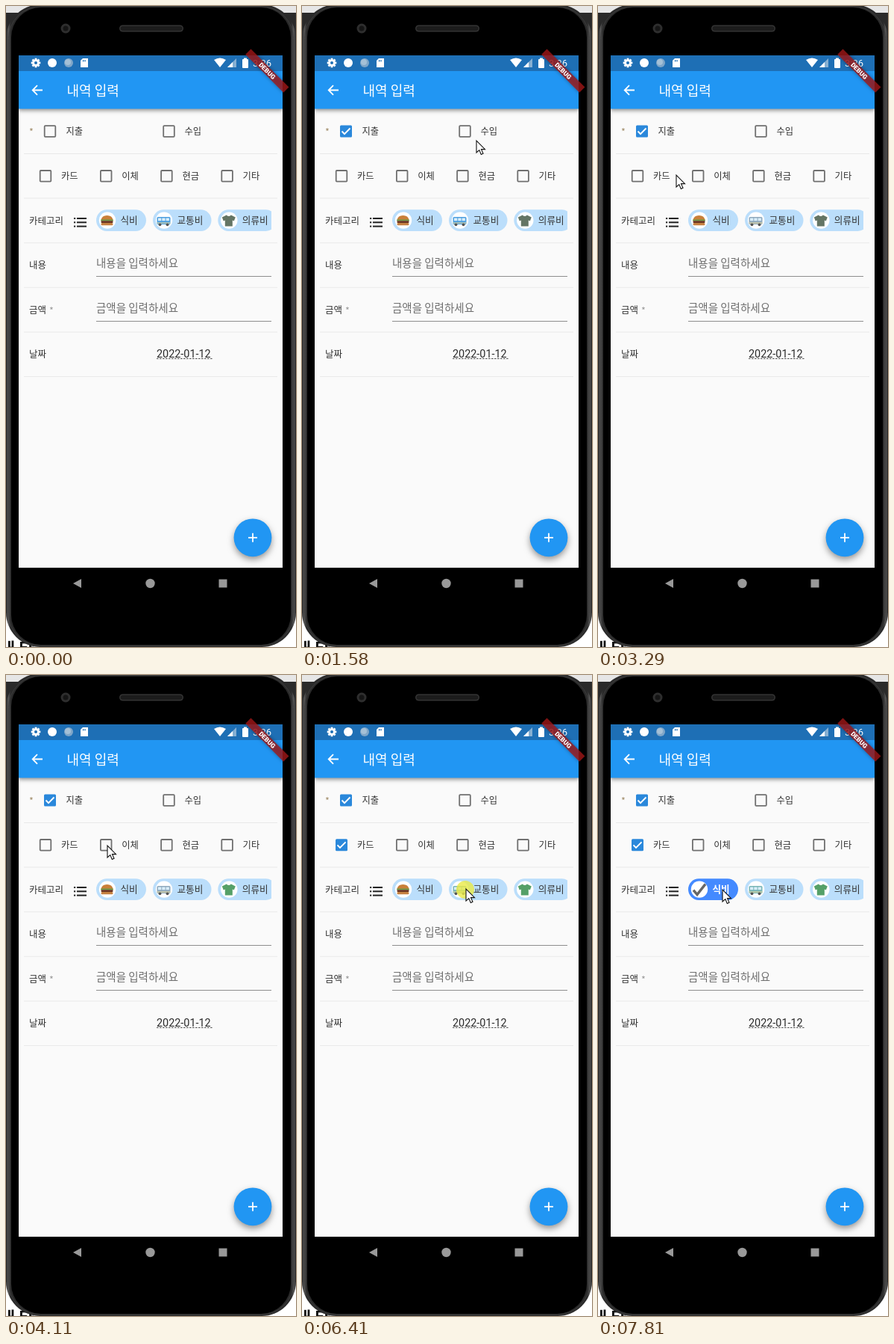
Write an HTML page with a canvas that moves like this. It is 389 by 857 pixels and loops after 8 s.

```html
<!DOCTYPE html>
<html lang="ko">
<head>
<meta charset="utf-8">
<style>
html, body { margin: 0; width: 100%; height: 100%; overflow: hidden; background: #fff; }
canvas { display: block; width: 389px; height: 857px; }
</style>
</head>
<body>
<canvas id="stage" width="389" height="857"></canvas>
<script>
const c = document.getElementById('stage').getContext('2d');
const LOOP = 8000, BLUE = '#2196f3', INK = '#333';
const KR = '"Noto Sans CJK KR", "Noto Sans CJK", sans-serif', LATIN = 'Roboto, sans-serif';

// Pointer tip: [ms, x, y]
const PATH = [
  [190, 364, 838], [480, 260, 360], [750, 130, 126], [960, 72, 168], [1060, 60, 171], [1300, 60, 171],
  [1580, 234, 180], [1780, 233, 172], [1850, 232, 171], [2200, 55, 166], [2590, 214, 168], [2700, 214, 170],
  [3290, 105, 226], [3500, 62, 226], [3560, 62, 226], [3830, 326, 228], [4110, 136, 228], [4440, 136, 228],
  [5050, 75, 231], [5260, 53, 232], [5550, 53, 232], [6050, 158, 284], [6340, 220, 286], [6410, 220, 286],
  [6690, 150, 284], [6830, 150, 284], [7180, 229, 277], [7260, 229, 277], [7600, 168, 286], [7670, 167, 287]
];
const PRESSES = [[1100, 1240], [5330, 5470], [6340, 7260], [7670, 7750]];

function pointerAt(t) {
  const i = PATH.findIndex(k => k[0] > t);
  if (i === 0) return null;
  if (i < 0) return PATH[PATH.length - 1].slice(1);
  const [t0, x0, y0] = PATH[i - 1], [t1, x1, y1] = PATH[i];
  const p = (t - t0) / (t1 - t0), e = p * p * (3 - 2 * p);
  return [x0 + (x1 - x0) * e, y0 + (y1 - y0) * e];
}

function rect(x, y, w, h, fill, r = 0) {
  c.fillStyle = fill;
  c.beginPath();
  c.roundRect(x, y, w, h, r);
  c.fill();
}
function disc(x, y, r, fill) {
  c.fillStyle = fill;
  c.beginPath();
  c.arc(x, y, r, 0, 7);
  c.fill();
}
function shape(d, x, y, fill, stroke, width = 1) {
  const p = new Path2D(d);
  c.save();
  c.translate(x, y);
  if (fill) { c.fillStyle = fill; c.fill(p); }
  if (stroke) { c.strokeStyle = stroke; c.lineWidth = width; c.stroke(p); }
  c.restore();
}
// y is the vertical middle of the glyphs
function text(s, x, y, size, color = INK, weight = 400, family = KR) {
  c.font = `${weight} ${size}px ${family}`;
  c.fillStyle = color;
  c.fillText(s, x, y + size * 0.37);
}
function shadow(color, blur, dy) {
  c.shadowColor = color;
  c.shadowBlur = blur;
  c.shadowOffsetY = dy;
}

function drawPhone() {
  rect(0, 0, 389, 857, '#fff');
  rect(0, 0, 389, 10, '#e6e6e6');
  rect(0, 9, 389, 60, '#2a2a2a');
  text('내 타', -8, 859, 22, '#111', 700);
  const rim = c.createLinearGradient(0, 0, 389, 0);
  [[0, '#222'], [.008, '#5a5a5a'], [.016, '#2a2a2a'], [.984, '#2a2a2a'], [.992, '#5a5a5a'], [1, '#222']]
    .forEach(s => rim.addColorStop(...s));
  rect(0, -2, 389, 859, rim, 46);
  rect(7, 2, 375, 852, '#000', 40);
  c.strokeStyle = '#3c3c3c';
  c.lineWidth = 1;
  c.beginPath();
  c.roundRect(3.5, 0.5, 382, 855, 43);
  c.stroke();
  disc(80, 30, 6.5, '#2e2e2e');
  disc(80, 30, 3.5, '#151515');
  rect(152, 25.5, 86, 9, '#343434', 4.5);
  rect(153.5, 27, 83, 6, '#1c1c1c', 3);
  shape('M5 -6V6L-6 0Z', 96, 772, '#999');
  disc(193.5, 772, 6.2, '#999');
  rect(285.5, 766.5, 11, 11, '#999');
}

function drawStatusBar() {
  rect(17, 66, 354, 21, '#1e6fb5');
  for (let i = 0; i < 8; i++) {
    c.save();
    c.translate(40, 76);
    c.rotate(i * Math.PI / 4);
    rect(-1.4, -6.3, 2.8, 3, '#fff');
    c.restore();
  }
  disc(40, 76, 4.8, '#fff');
  disc(40, 76, 2, '#1e6fb5');
  disc(62, 76, 6, '#fff');
  disc(84, 76, 6, '#7fa6c8');
  disc(83, 75, 4, '#a5c0d6');
  shape('M-2 -6H5V6H-5V-3Z', 105, 76, '#fff');
  rect(103, 72, 1.2, 2.5, '#1e6fb5');
  rect(105.4, 72, 1.2, 2.5, '#1e6fb5');
  shape('M0 6L-8 -4Q0 -9 8 -4Z', 287, 76, '#fff');
  shape('M6 -6V6H-6Z', 303, 76, '#86afd2');
  shape('M1 -1V6H-6Z', 303, 76, '#fff');
  rect(317, 71, 8, 12, '#fff', 1);
  rect(319, 69.5, 4, 2, '#fff');
  text('3:36', 331, 76, 13, '#fff', 400, LATIN);
}

function drawBanner() {
  c.save();
  c.translate(371, 66);
  c.rotate(Math.PI / 4);
  shadow('rgba(0,0,0,.45)', 5, 0);
  rect(-36, 24.1, 72, 10.3, 'rgba(165,24,24,.78)');
  shadow('transparent', 0, 0);
  c.textAlign = 'center';
  text('DEBUG', 0, 29.2, 8.6, '#fff', 900, LATIN);
  c.restore();
}

function checkbox(x, y, label, labelX, on) {
  if (on) {
    rect(x - 8, y - 8, 16, 16, '#2a88db', 1.5);
    shape('M-5.5 0L-2 3.7L5.5 -4', x, y, null, '#fff', 1.9);
  } else {
    c.strokeStyle = '#707070';
    c.lineWidth = 1.8;
    c.beginPath();
    c.roundRect(x - 7.3, y - 7.3, 14.6, 14.6, 1);
    c.stroke();
  }
  text(label, labelX, y, 12.3);
}

const burger = x => {
  shape('M-8 -1Q-7 -7 0 -7Q7 -7 8 -1Z', x, 287, '#c9803a');
  rect(x - 8.5, 285.5, 17, 2, '#6f9a45', 1);
  rect(x - 8, 287.3, 16, 2.6, '#6b3524', 1);
  rect(x - 8, 290, 16, 3.2, '#c58142', 1.5);
};
const bus = (x, t) => {
  rect(x - 9, 282, 18, 10, t < 3000 ? '#4d9fdf' : t < 6000 ? '#8fa9bd' : '#78b5b5', 1.5);
  for (let i = 0; i < 3; i++) rect(x - 7.5 + i * 5.3, 283.5, 4.3, 3.7, '#d9eefa');
  rect(x - 9, 289.5, 18, 1.2, '#e5d9a0');
  [-5, 5].forEach(d => disc(x + d, 292.3, 1.9, '#555'));
};
const shirt = (x, t) => shape('M-3 -7Q0 -4 3 -7L9 -4L7 1L5 0V8H-5V0L-7 1L-9 -4Z', x, 286.5,
  t < 3560 ? '#647565' : '#55a068');
const gift = x => {
  rect(x - 6, 282, 12, 10, '#d07a7a', 1);
  rect(x - 1, 282, 2, 10, '#f2dca0');
};

function chip(x, w, label, icon, t, on) {
  rect(x, 272.3, w, 28.6, on ? '#448aff' : '#bbdefb', 14.3);
  disc(x + 15, 286.6, 11.2, '#fff');
  if (on) shape('M-8 1L-3 7L8 -7', x + 15, 286.6, null, '#666', 3.4);
  else icon(x + 14.5, t);
  text(label, x + 32.5, 286.6, 12.6, on ? '#fff' : INK, on ? 700 : 400);
}

function drawChips(t, scroll, glow) {
  c.save();
  c.beginPath();
  c.rect(121, 260, 235, 52);
  c.clip();
  c.translate(-scroll, 0);
  chip(121, 67, '식비', burger, t, t >= 7740);
  chip(197, 78.5, '교통비', bus, t);
  chip(284.3, 78.5, '의류비', shirt, t);
  chip(372, 78.5, '선물비', gift, t);
  c.restore();
  if (glow) rect(121, 271, 2, 30, 'rgba(175,200,225,.9)');
}

function drawForm(t, scroll, glow) {
  rect(17, 66, 354, 685, '#fafafa');
  shadow('rgba(0,0,0,.4)', 5, 2);
  rect(17, 87, 354, 50.5, BLUE);
  shadow('transparent', 0, 0);
  drawStatusBar();
  shape('M7 0H-6M0 -6.3L-6.3 0L0 6.3', 42, 112.5, null, '#fff', 1.8);
  text('내역 입력', 81.5, 113, 18, '#fff');
  drawBanner();

  for (let i = 0; i < 6; i++) rect(24, 197 + i * 59.6, 340, 1, '#e9e9e9');
  text('*', 31, 168.5, 12.5, '#a08c68');
  checkbox(59, 167.5, '지출', 80.5, t >= 1240);
  checkbox(218.5, 167.5, '수입', 239.5);
  ['카드', '이체', '현금', '기타'].forEach((s, i) =>
    checkbox(53 + i * 81.2, 227.3, s, 74 + i * 81.2, i === 0 && t >= 5470));

  text('카테고리', 31, 287, 12.5);
  for (let i = 0; i < 3; i++) {
    rect(91, 283 + i * 5.3, 2.2, 2, '#222');
    rect(95, 283 + i * 5.3, 13, 2, '#222');
  }
  drawChips(t, scroll, glow);

  [['내용', 346], ['금액', 406]].forEach(([s, y]) => {
    text(s, 31, y, 12.5);
    text(s + '을 입력하세요', 121, y - 2, 14.5, '#6e6e6e');
    rect(121, y + 15, 235, 1, '#8e8e8e');
  });
  text('*', 58, 407, 12.5, '#999');
  text('날짜', 31, 465.5, 12.5);
  text('2022-01-12', 202, 465, 14.4, '#2a2a2a', 400, LATIN);
  for (let x = 202; x < 275; x += 4) rect(x, 471, 2.6, 1, '#555');

  shadow('rgba(0,0,0,.4)', 8, 4);
  disc(331, 710.8, 25.4, BLUE);
  shadow('transparent', 0, 0);
  rect(325, 709.9, 12, 1.8, '#fff');
  rect(330.1, 704.8, 1.8, 12, '#fff');
}

function draw(t) {
  const tip = pointerAt(t);
  const pressed = PRESSES.some(([a, b]) => t >= a && t < b);
  const dragging = pressed && t > 6400 && t < 7300;
  drawPhone();
  drawForm(t, dragging ? Math.max(0, 205 - tip[0]) : 0, dragging && t > 6900 && tip[0] > 215);
  if (!tip) return;
  if (pressed) disc(tip[0] - 1, tip[1] + 1, 12, 'rgba(234,234,70,.8)');
  shape('M0 0V16L3.8 12.6L6.3 18.5L9 17.3L6.5 11.6H11.5Z', tip[0], tip[1], '#fff', '#111', 1.1);
}

function frame(now) {
  draw(now % LOOP);
  requestAnimationFrame(frame);
}
requestAnimationFrame(frame);
</script>
</body>
</html>
```
